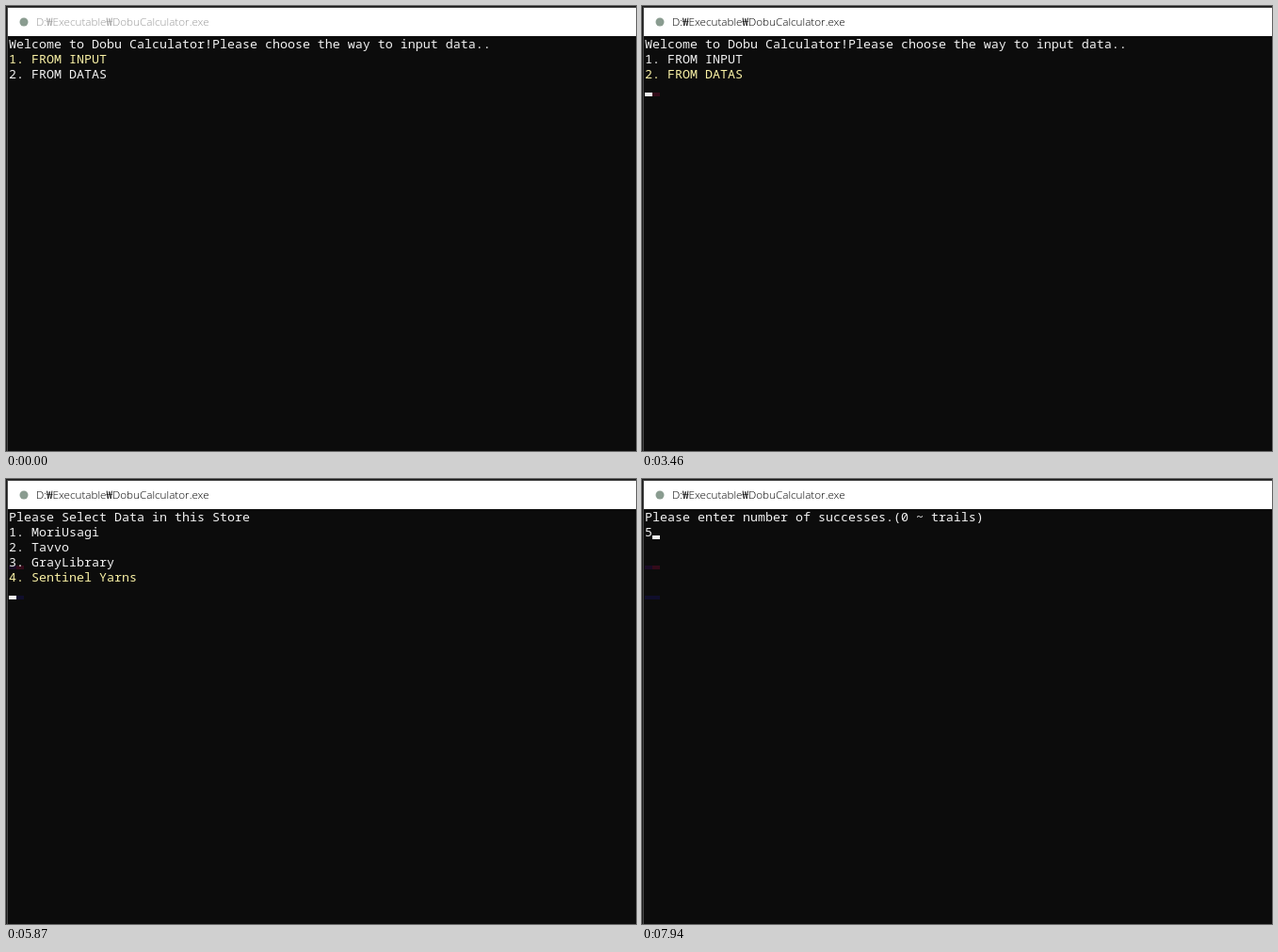
An HTML page with a canvas that plays this animation: 669x473 px, repeating every 8 s.

```html
<!DOCTYPE html>
<html lang="en">
<head>
<meta charset="utf-8">
<title>Console menu</title>
<style>
  html, body { margin: 0; width: 669px; height: 473px; overflow: hidden; background: #0c0c0c; }
  canvas { display: block; }
</style>
</head>
<body>
<canvas id="stage" width="669" height="473"></canvas>
<script>
const ctx = document.getElementById('stage').getContext('2d');
const LOOP = 8000, LEFT = 3, TOP = 32, CHAR = 8, LINE = 16;
const WHITE = '#f2f2f2', YELLOW = '#f9f1a5';

const screens = {
  blank: [],
  input: ['Welcome to Dobu Calculator!Please choose the way to input data..',
    '1. FROM INPUT', '2. FROM DATAS', ''],
  store: ['Please Select Data in this Store',
    '1. MoriUsagi', '2. Tavvo', '3. GrayLibrary', '4. Sentinel Yarns', ''],
  prompt: ['Please enter number of successes.(0 ~ trails)', ''],
  answer: ['Please enter number of successes.(0 ~ trails)', '5'],
};

// [start time, screen, highlighted line, cursor shown]
const steps = [
  [0, 'input', 1, false],
  [1920, 'input', 1, true],
  [2450, 'input', 1, false],
  [2930, 'input', 1, true],
  [3390, 'blank', 0, false],
  [3460, 'input', 2, true],
  [3940, 'blank', 0, false],
  [4010, 'store', 1, true],
  [4540, 'store', 1, false],
  [5070, 'store', 1, true],
  [5200, 'store', 0, true],
  [5270, 'store', 2, true],
  [5600, 'store', 0, true],
  [5670, 'store', 3, true],
  [5800, 'store', 0, true],
  [5870, 'store', 4, true],
  [6200, 'store', 0, true],
  [6270, 'store', 3, true],
  [6370, 'store', 0, true],
  [6440, 'store', 2, true],
  [6540, 'blank', 0, false],
  [6610, 'store', 1, true],
  [7010, 'blank', 0, false],
  [7080, 'prompt', 0, true],
  [7740, 'prompt', 0, false],
  [7940, 'answer', 0, true],
];

function box(x, y, w, h, color) {
  ctx.fillStyle = color;
  ctx.fillRect(x, y, w, h);
}

function text(str, x, y, font, color) {
  ctx.font = font;
  ctx.fillStyle = color;
  ctx.fillText(str, x, y);
}

function cursorBar(column, row, color) {
  box(LEFT + column * CHAR, TOP + row * LINE + 12, CHAR, 4, color);
}

function drawWindow(active) {
  box(0, 0, 669, 473, '#1c1c1c');
  box(1, 1, 668, 472, '#484848');
  box(2, 2, 667, 471, '#0c0c0c');
  box(2, 2, 667, 30, '#fff');
  ctx.fillStyle = '#8a9c90';
  ctx.beginPath();
  ctx.arc(19, 17, 4.5, 0, Math.PI * 2);
  ctx.fill();
  text('D:₩Executable₩DobuCalculator.exe', 32, 21,
    '300 11.7px "Open Sans", "Noto Sans CJK KR", sans-serif', active ? '#000' : '#999');
}

// Faint trails left where the cursor has been
function drawTrails(t) {
  if (t >= 3460) {
    cursorBar(0, 3, '#190b26');
    cursorBar(1, 3, '#340b1a');
  }
  if (t >= 5670) {
    cursorBar(0, 5, '#100e2c');
    cursorBar(1, 5, '#100e2c');
  }
}

function draw(t) {
  const [, name, selected, cursor] = steps.findLast(step => step[0] <= t);
  const lines = screens[name];
  drawWindow(t >= 1390);
  drawTrails(t);
  lines.forEach((line, row) => text(line, LEFT, TOP + row * LINE + 13,
    '13.333px "Noto Sans Mono", monospace', row && row === selected ? YELLOW : WHITE));
  if (cursor) cursorBar(lines.at(-1).length, lines.length - 1, WHITE);
}

const start = performance.now();
function frame() {
  draw((performance.now() - start) % LOOP);
  requestAnimationFrame(frame);
}
frame();
</script>
</body>
</html>
```
